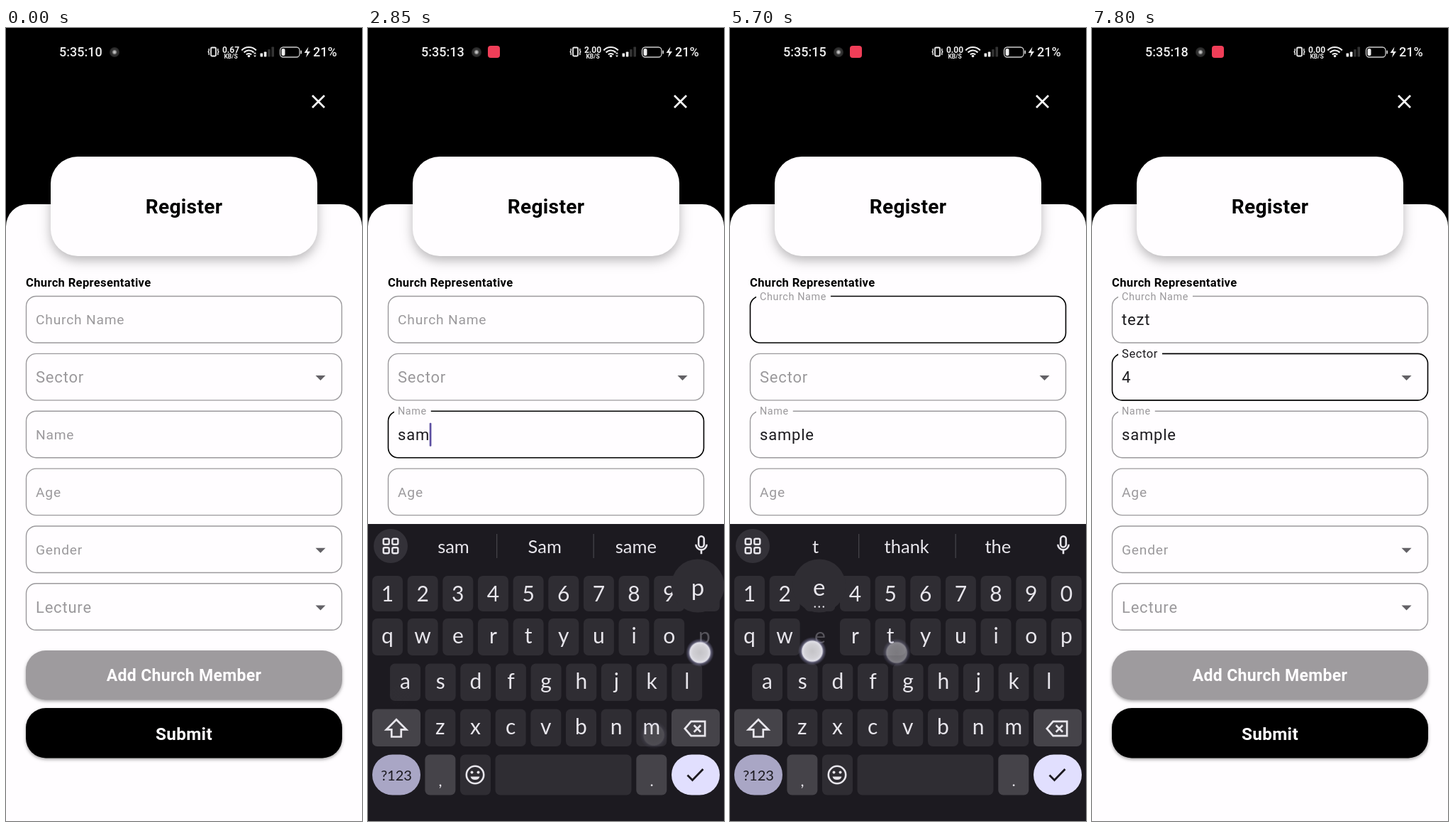
Animation of 502 by 1116 pixels, one loop 8 s. Source, as an HTML page with a canvas:

```html
<!DOCTYPE html>
<html lang="en">
<head>
<meta charset="utf-8">
<title>Register form</title>
<style>
  html, body { margin: 0; width: 100%; height: 100%; overflow: hidden; background: #000; }
  canvas { display: block; width: 100%; height: 100%; }
</style>
</head>
<body>
<canvas id="stage" width="502" height="1116"></canvas>
<script>
const ctx = document.getElementById('stage').getContext('2d');
const LOOP = 8000;
const PAPER = '#fffdff', GREY = '#9b999c', INK = '#1c1b1f';
const BOARD = '#1c1a20', KEY = '#2f2d33', MOD_KEY = '#454349', GLYPH = '#e8e6ec', DIM = '#68666d';

// [time, value] steps
const nameSteps = [[750, ''], [1250, ''], [2150, ''], [2450, 's'], [2560, 'sa'], [2680, 'sam'],
  [2950, 'samp'], [3150, 'sampl'], [4350, 'sample']];
const churchSteps = [[4800, ''], [5750, 't'], [5850, 'te'], [5950, 'tez'], [6050, 'tezt']];
const suggestionSteps = [[0, ''], [2430, 's so see'], [2560, 'sa say same'], [2700, 'sam Sam same'],
  [2950, 'samp sample samples'], [3200, 'sampl sample samples'], [4400, 'sample samples sampler'],
  [4850, ''], [5620, 't thank the'], [5820, 'te the test'], [5930, 'tez tea ten'], [6060, 'tezt test text']];
const speedSteps = [[0, '0.67'], [400, '2.00'], [4250, '0.00']];

// x, y, down, up, key
const touches = [
  [300, 572, 600, 690], [96, 940, 2350, 2410, 's'], [45, 940, 2460, 2520, 'a'], [403, 995, 2590, 2650, 'm'],
  [468, 879, 2820, 2900, 'p'], [446, 945, 2980, 3060, 'l'], [116, 877, 4230, 4350, 'e'],
  [300, 410, 4740, 4770], [235, 879, 5500, 5600, 't'], [116, 877, 5650, 5740, 'e'],
  [104, 1000, 5800, 5870, 'z'], [235, 879, 5930, 6000, 't'], [316, 480, 6350, 6440], [300, 585, 7350, 7420]
];

const clamp = v => Math.max(0, Math.min(1, v));
const progress = (t, from, length) => clamp((t - from) / length);
const stepAt = (steps, t) => steps.filter(s => s[0] <= t).pop();

function box(x, y, w, h, r, fill, stroke, lineWidth = 1.4) {
  ctx.beginPath();
  ctx.roundRect(x, y, w, h, r);
  if (fill) { ctx.fillStyle = fill; ctx.fill(); }
  if (stroke) { ctx.strokeStyle = stroke; ctx.lineWidth = lineWidth; ctx.stroke(); }
}
function disc(x, y, r, fill, stroke, lineWidth) {
  box(x - r, y - r, 2 * r, 2 * r, r, fill, stroke, lineWidth);
}
function text(str, x, y, font, color, align = 'left', spacing = 0) {
  ctx.font = font;
  ctx.fillStyle = color;
  ctx.textAlign = align;
  ctx.letterSpacing = spacing + 'px';
  ctx.fillText(str, x, y);
  return ctx.measureText(str).width;
}
const roboto = (size, weight = 400) => `${weight} ${size}px Roboto, sans-serif`;
const lato = (size, weight = 400) => `${weight} ${size}px Lato, sans-serif`;

// Path on a 24-unit grid centred at x, y; filled when lineWidth is 0
function icon(x, y, d, color, lineWidth = 0, scale = 1.28) {
  ctx.save();
  ctx.translate(x - 12 * scale, y - 12 * scale);
  ctx.scale(scale, scale);
  line(d, color, lineWidth);
  ctx.restore();
}
function line(d, color, lineWidth) {
  const path = new Path2D(d);
  if (lineWidth) { ctx.strokeStyle = color; ctx.lineWidth = lineWidth; ctx.stroke(path); }
  else { ctx.fillStyle = color; ctx.fill(path); }
}
function shadow(color, blur, dy, draw) {
  ctx.save();
  ctx.shadowColor = color;
  ctx.shadowBlur = blur;
  ctx.shadowOffsetY = dy;
  draw();
  ctx.restore();
}

function statusBar(t) {
  text('5:35:' + (10 + Math.floor((t + 200) / 1000)), 75, 40, roboto(18, 500), '#eee');
  const glow = ctx.createRadialGradient(153, 34, 0, 153, 34, 7);
  glow.addColorStop(0, '#ddd');
  glow.addColorStop(0.35, '#888');
  glow.addColorStop(0.5, '#3a3a3a');
  glow.addColorStop(1, '#222');
  disc(153, 34, 7, glow);
  if (t > 900) box(169, 25, 17, 17, 4, '#f03e58');

  box(289, 27.5, 7, 12, 1.5, null, '#eee', 1.8);
  line('M286.2 29v3l-1 1.5 1 1.5v3M298.8 29v3l1 1.5-1 1.5v3', '#eee', 1.4);
  text(stepAt(speedSteps, t)[1], 317, 34.5, roboto(12, 700), '#eee', 'center');
  text('KB/S', 317, 42.5, roboto(8.5, 700), '#eee', 'center');

  ctx.strokeStyle = '#eee';
  ctx.lineWidth = 2.2;
  for (const r of [5, 9.5, 14]) {
    ctx.beginPath();
    ctx.arc(342.5, 41, r, -Math.PI * 0.76, -Math.PI * 0.24);
    ctx.stroke();
  }
  disc(342.5, 39.5, 1.8, '#eee');
  if (t < 4250) line('M349 36.5l2-2.5 2 2.5zM349 38.5l2 2.5 2-2.5z', '#eee', 0);
  [5, 7, 10.5, 14].forEach((h, i) => box(358.5 + i * 5.3, 40.5 - h, 3.6, h, 0.8, i < 2 ? '#eee' : '#333'));

  box(386.5, 27, 27.5, 14, 4.5, null, '#ccc', 1.3);
  box(388.5, 29, 5, 10, 2, '#eee');
  box(415.3, 31.5, 1.8, 5, 1, '#ccc');
  line('M426.5 26.5l-6 8.5h4l-1.500 6.500 6-8.500h-4z', '#eee', 0);
  text('21%', 433, 40, roboto(18, 500), '#eee');
}

const fieldTop = i => 377.5 + 80.86 * i;

function field(i, label, { size = 19.2, float = 0, focused = false, value = '', arrow = false, cursor = false,
                           floatColor = GREY } = {}) {
  const y = fieldTop(i), mid = y + 33;
  box(28.5, y, 445, 65.5, 14, PAPER, focused ? '#000' : GREY, focused ? 1.6 : 1.4);
  const scale = 1 - 0.25 * float;
  ctx.font = roboto(size);
  ctx.letterSpacing = '0.8px';
  if (float) {
    const gap = (ctx.measureText(label).width * 0.75 + 11) * float;
    ctx.fillStyle = PAPER;
    ctx.fillRect(37, y - 2, gap, 5);
  }
  const baseline = mid + size * 0.355;
  ctx.save();
  ctx.translate(42, baseline + (y + size * 0.265 - baseline) * float);
  ctx.scale(scale, scale);
  text(label, 0, 0, roboto(size), float ? floatColor : GREY, 'left', 0.8);
  ctx.restore();
  const width = value ? text(value, 42, mid + 7.3, roboto(22), INK, 'left', 0.8) : 0;
  if (cursor) box(41.7 + width, y + 16.5, 2.7, 33, 1, '#5d50a2');
  if (arrow) line(`M436.500 ${mid - 2.3}h14l-7 7z`, '#636166', 0);
}

function form(t) {
  const bottom = t > 1750 && t < 6650 ? 698 : 1116;
  ctx.save();
  ctx.beginPath();
  ctx.rect(0, 0, 502, bottom);
  ctx.clip();
  box(0, 248, 502, 900, 31, PAPER);
  shadow('rgba(0,0,0,.28)', 16, 6, () => box(63, 181, 376, 140, 38, PAPER));
  text('Register', 251, 260.5, roboto(28.1, 700), '#000', 'center', 0.32);
  text('Church Representative', 28, 364, roboto(16.6, 700), '#000', 'left', 0.32);

  const nameFocus = t >= 750 && t < 4800, churchFocus = t >= 4800 && t < 6600, chosen = t >= 7420;
  const typed = (steps, focused) => {
    const [since, value] = stepAt(steps, t) || [0, ''];
    return { focused, value, float: progress(t, steps[0][0], 150),
             cursor: focused && Math.floor((t - since) / 500) % 2 === 0 };
  };
  field(0, 'Church Name', typed(churchSteps, churchFocus));
  field(1, 'Sector', { size: 22, arrow: true, float: +chosen, focused: chosen, value: chosen ? '4' : '', floatColor: INK });
  field(2, 'Name', typed(nameSteps, nameFocus));
  field(3, 'Age');
  field(4, 'Gender', { arrow: true });
  field(5, 'Lecture', { size: 22, arrow: true });

  shadow('rgba(0,0,0,.35)', 4, 2, () => {
    box(28, 876, 446, 69.5, 28, '#9e9b9e');
    box(28, 957, 446, 70.5, 28, '#000');
  });
  text('Add Church Member', 251, 919, roboto(23, 700), PAPER, 'center', 0.32);
  text('Submit', 251, 1001.5, roboto(24.3, 700), PAPER, 'center', 0.32);
  ctx.restore();
}

function menu(t) {
  const open = progress(t, 6600, 300);
  const alpha = clamp(open * 4) * (1 - progress(t, 7430, 90));
  if (!alpha) return;
  const item = 61.3, pad = 10.2, top = 360;
  const height = item + 2 * pad + 10 * item * clamp((open - 0.25) * 4);
  ctx.save();
  ctx.globalAlpha = alpha;
  shadow('rgba(0,0,0,.3)', 16, 5, () => box(21.600, top, 458.800, height, 3, PAPER));
  for (let i = 0; i < 11; i++) {
    ctx.globalAlpha = alpha * clamp((open - 0.5 - i * 0.035) * 8);
    text(String(i + 1), 42, top + pad + item * (i + 0.5) + 8, roboto(22), INK, 'left', 0.8);
  }
  ctx.restore();
}

const keyRows = [
  { letters: '1234567890', x: 6, y: 771, h: 50 },
  { letters: 'qwertyuiop', x: 6, y: 831, h: 52 },
  { letters: 'asdfghjkl', x: 31, y: 894.5, h: 52.5 },
  { letters: 'zxcvbnm', x: 80.4, y: 958.5, h: 52.5 }
];
const PITCH = 49.65;

function toolbar(t) {
  disc(32, 729, 24, '#333138');
  for (const dx of [-6.3, 6.3]) for (const dy of [-6.3, 6.3])
    box(32 + dx - 4, 729 + dy - 4, 8, 8, 2, null, GLYPH, 2.4);
  icon(470, 728, 'M12 14a3 3 0 0 0 3-3V5a3 3 0 0 0-6 0v6a3 3 0 0 0 3 3zM6 11a6 6 0 0 0 12 0M12 17v4.500', GLYPH, 2);

  const words = stepAt(suggestionSteps, t)[1];
  if (words) {
    words.split(' ').forEach((word, i) => text(word, 120.500 + i * 128.700, 739, lato(25.5), GLYPH, 'center'));
    for (const x of [181, 317.5]) box(x, 712, 1.3, 34, 0, MOD_KEY);
    return;
  }
  icon(104, 729, 'M4 3h16q1 0 1 1v10l-7 7H4q-1 0-1-1V4q0-1 1-1zM21 14h-7v7M7 12q4 5 9-1M8 7.500v2M15 7v2', DIM, 2, 1.25);
  text('GIF', 177.500, 737, roboto(21, 900), DIM, 'center', 1);
  icon(250, 729, 'M4 4h16v17H4zM8 4v3h8V4M8 11h8M8 14h8M8 17.500h5', GLYPH, 2, 1.2);
  icon(250, 729, 'M9 4a3 3 0 0 1 6 0v3H9z', GLYPH, 0, 1.2);
  ctx.save();
  ctx.setLineDash([4.3, 4.34]);
  disc(323, 729, 9.9, null, GLYPH, 4);
  ctx.restore();
  disc(323, 729, 6.6, null, GLYPH, 5);
  icon(397, 729, 'M12 3a9 9 0 0 0 0 18c.83 0 1.500-.67 1.500-1.500 0-.4-.15-.74-.4-1-.23-.26-.38-.6-.38-1 0-.83.67-1.500 1.500-1.500H16c2.760 0 5-2.240 5-5 0-4.420-4-8-9-8z', GLYPH);
  for (const [x, y] of [[389, 728], [393.5, 722.5], [400, 722.5], [404.5, 728]]) disc(x, y, 1.9, BOARD);
}

function keyboard(t) {
  const hiding = t >= 6450;
  const offset = hiding ? 418 * progress(t, 6450, 300) ** 2.86 : 418 * (1 - progress(t, 1000, 500)) ** 2.15;
  if (offset >= 418) return;
  ctx.save();
  ctx.translate(0, offset);
  const top = hiding ? 760 : 698;
  ctx.fillStyle = BOARD;
  ctx.fillRect(0, top, 502, 1120 - top);
  if (!hiding) toolbar(t);

  const press = touches.find(([, , down, up, key]) => key && t >= down && t < up + 30);
  let popup = null;
  keyRows.forEach((row, r) => [...row.letters].forEach((letter, i) => {
    const x = row.x + PITCH * i, cx = x + 21.500, cy = row.y + row.h / 2;
    const pressed = press && press[4] === letter;
    if (pressed) popup = { letter, x: Math.min(cx - 1, 465), y: cy - 72 };
    else box(x, row.y, 43, row.h, 7, KEY);
    text(letter, cx, cy + (r ? 9.3 : 11.3), lato(30), pressed ? '#57555c' : GLYPH, 'center');
  }));

  box(6, 958.5, 68, 52.5, 7, MOD_KEY);
  icon(40, 986, 'M12 2.500L1.500 13H7v7.500h10V13h5.500z', GLYPH, 2, 1.35);
  box(428, 958.5, 68, 52.5, 7, MOD_KEY);
  icon(461, 986, 'M8 4.500h14.500v15H8L1.500 12zM11 8.500l7 7M18 8.500l-7 7', GLYPH, 2, 1.35);

  box(6, 1022.5, 68, 57, 28.5, '#a9a6c5');
  text('?123', 40, 1059, lato(20), BOARD, 'center');
  box(80.4, 1022.5, 43, 57, 7, MOD_KEY);
  text(',', 102, 1067, lato(22), GLYPH, 'center');
  const spaceX = hiding ? 130 : 179.500;
  box(spaceX, 1022.5, 371.5 - spaceX, 57, 7, KEY);
  if (!hiding) {
    box(130, 1022.5, 43, 57, 7, KEY);
    disc(151, 1051, 12.2, null, GLYPH, 2.6);
    disc(146.5, 1047.5, 2, GLYPH);
    disc(155.5, 1047.5, 2, GLYPH);
    line('M144.500 1053.500h13a6.700 6 0 0 1-13 0z', GLYPH, 0);
  }
  box(378.3, 1022.5, 43, 57, 7, MOD_KEY);
  text('.', 400, 1067, lato(22), GLYPH, 'center');
  box(428, 1022.5, 68, 57, 28.5, '#e1dffe');
  line(hiding ? 'M473 1046v6h-23M456 1045l-7 7 7 7' : 'M450.500 1051.500l7 7 15-15.500', BOARD, 2.8);

  if (popup) {
    disc(popup.x, popup.y, 37.5, '#2f2d33');
    text(popup.letter, popup.x, popup.y + 14, lato(33), GLYPH, 'center');
    if ('aest'.includes(popup.letter)) for (const dx of [-6, 0, 6]) disc(popup.x + dx, popup.y + 29.5, 1.2, GLYPH);
  }
  ctx.restore();
}

function touchDots(t) {
  for (const [x, y, down, up] of touches) {
    if (t < down) continue;
    const alpha = (1 - progress(t, up, 350)) ** 2;
    if (!alpha) continue;
    const glow = ctx.createRadialGradient(x, y, 0, x, y, 20);
    glow.addColorStop(0, 'rgba(205,204,208,.95)');
    glow.addColorStop(0.5, 'rgba(218,217,222,.95)');
    glow.addColorStop(0.7, 'rgba(235,234,242,.95)');
    glow.addColorStop(0.8, 'rgba(150,148,185,.5)');
    glow.addColorStop(1, 'rgba(130,128,170,0)');
    ctx.save();
    ctx.globalAlpha = alpha;
    disc(x, y, 20, glow);
    ctx.restore();
  }
}

function draw(t) {
  ctx.fillStyle = '#000';
  ctx.fillRect(0, 0, 502, 1116);
  statusBar(t);
  line('M432 95l17 17M449 95l-17 17', '#fff', 2.7);
  form(t);
  menu(t);
  keyboard(t);
  touchDots(t);
}

const start = performance.now();
function frame() {
  draw((performance.now() - start) % LOOP);
  requestAnimationFrame(frame);
}
frame();
</script>
</body>
</html>
```
